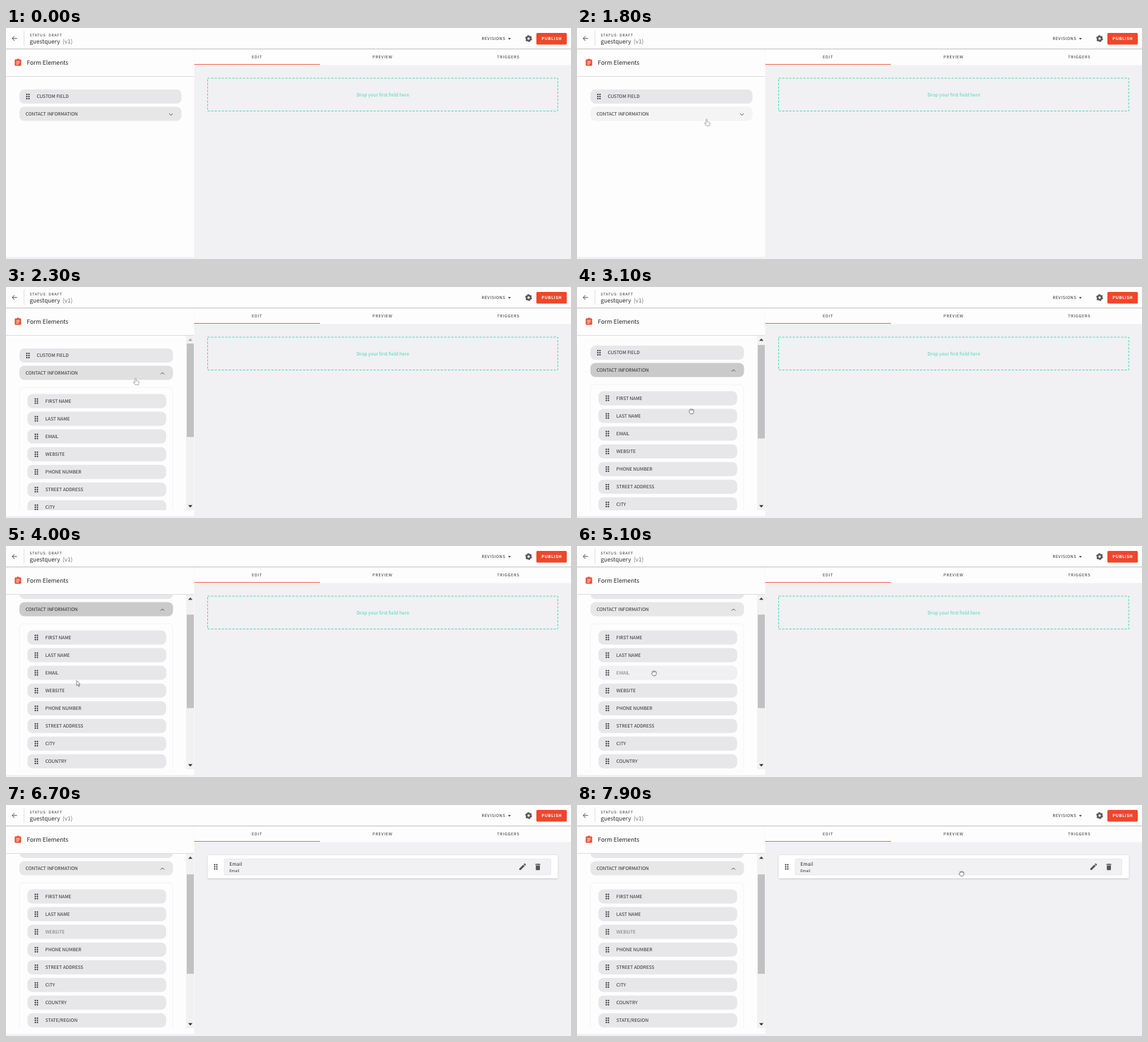
Animation of 800x327 px, one loop 8 s. Source, as an HTML page:

```html
<!DOCTYPE html>
<html lang="en">
<head>
<meta charset="utf-8">
<title>Form builder</title>
<style>
html, body { margin: 0; width: 100%; height: 100%; overflow: hidden; background: #f1f0f2; }
svg { display: block; }
text { font-family: "Noto Sans CJK SC", "Noto Sans CJK JP", "Noto Sans CJK", "Open Sans", sans-serif; font-size: 6.55px; fill: #2c2c2c; white-space: pre; text-rendering: geometricPrecision; }
.tab { font-size: 5.6px; letter-spacing: .7px; }
.line { fill: none; stroke: #555; stroke-width: 1; }
.cur { fill: #fff; stroke: #555; stroke-width: .7; stroke-linejoin: round; }
</style>
</head>
<body>
<svg width="800" height="327" viewBox="0 0 800 327">
  <defs>
    <filter id="soft" x="-5%" y="-20%" width="110%" height="150%">
      <feDropShadow dx="0" dy=".6" stdDeviation=".8" flood-opacity=".25"/>
    </filter>
    <path id="dots" d="M-1.5-3v0M1.5-3v0M-1.5 0v0M1.5 0v0M-1.5 3v0M1.5 3v0" stroke="#222" stroke-width="2" stroke-linecap="round"/>
    <path id="arrow" class="cur" d="M0 0V7.2L1.7 5.7L2.9 8.4L4 7.9L2.8 5.3H5Z"/>
    <path id="point" class="cur" style="stroke:#888" d="M-.8.6Q0-.4.8.6V3.6L4 4.4Q5 4.8 4.8 6L4 9.4H-.6L-3 6.2Q-3.2 5-2 5.2L-.8 6.2Z"/>
    <path id="grab" class="cur" d="M-2.4-.2V-2.2Q-1.8-3.4-1-2.6Q-.2-4 .7-2.8Q1.7-3.5 2.2-2.2Q3.3-2.2 3.3-1V1.2L2.2 3.6H-1.4L-3.3.9Q-3.5-.4-2.4-.2ZM-1-2.6V-1M.7-2.8V-1M2.2-2.2V-1"/>
  </defs>

  <rect width="800" height="327" fill="#f1f0f2"/>
  <rect width="266.5" height="324" fill="#fefdfe"/>
  <rect x="266.5" y="29" width="533.5" height="23.5" fill="#fefdfe"/>
  <path d="M266.5 51.5H444.5" stroke="#ee6a54"/>
  <g text-anchor="middle">
    <text class="tab" x="355.5" y="43.3">EDIT</text>
    <text class="tab" x="533.3" y="43.3">PREVIEW</text>
    <text class="tab" x="711.3" y="43.3">TRIGGERS</text>
  </g>

  <path d="M0 68.5H266" stroke="#dedddf"/>
  <rect x="12.4" y="44.6" width="9" height="9" rx="1" fill="#ea4a2e"/>
  <circle cx="16.9" cy="44.7" r="1.5" fill="#ea4a2e"/>
  <path d="M14.4 47.2h5M14.4 49.2h5M14.4 51.2h3.4" stroke="#fff" stroke-width=".9"/>
  <text x="29.4" y="52" style="font-size:8.4px;fill:#222">Form Elements</text>

  <svg id="list" y="69" width="266.5" height="247" viewBox="0 69 266.5 247"></svg>
  <g id="main"></g>

  <g filter="url(#soft)"><rect x="-5" width="810" height="29" fill="#fefdfe"/></g>
  <path d="M0 29.4H800" stroke="#cfced0" stroke-width=".9"/>
  <path d="M25.5 4V25" stroke="#e2e1e3"/>
  <path class="line" d="M15.6 14.8H8.8M12 11.5L8.7 14.8L12 18.1"/>
  <text x="33.5" y="11.8" style="font-size:5.2px;letter-spacing:.7px">STATUS: DRAFT</text>
  <text x="33.5" y="21.6" style="font-size:8.2px">guestquery</text>
  <text x="80" y="21.6" style="font-size:8.2px;fill:#777">(v1)</text>
  <text x="673.5" y="17.2" style="font-size:5.8px;letter-spacing:.5px">REVISIONS</text>
  <path d="M710.8 14.2h4l-2 2.3z" fill="#333"/>
  <g fill="none" stroke="#555">
    <circle cx="740" cy="15" r="2.8" stroke-width="2.2"/>
    <circle cx="740" cy="15" r="4.1" stroke-width="1.5" stroke-dasharray="2.3 1.99"/>
  </g>
  <rect x="751" y="7" width="43" height="16.5" rx="1.5" fill="#f0462a"/>
  <text x="758.3" y="17.3" style="font-size:5.8px;letter-spacing:.5px;font-weight:600;fill:#fff">PUBLISH</text>

  <g id="cursor"></g>
</svg>
<script>
const LOOP = 8000, STEP = 100;
const DRAG = 5000, ENTER = 5700, DROP = 6700;
const FIELDS = ['FIRST NAME', 'LAST NAME', 'EMAIL', 'WEBSITE', 'PHONE NUMBER',
  'STREET ADDRESS', 'CITY', 'COUNTRY', 'STATE/REGION'];
const ROW = '#e7e6e8', TOP = 151.5, PITCH = 25.05;
const $ = id => document.getElementById(id);

// Piecewise linear track of [time, value, value...] keys
function track(keys, t) {
  if (t <= keys[0][0]) return keys[0].slice(1);
  for (let i = 1; i < keys.length; i++) {
    const a = keys[i - 1], b = keys[i];
    if (t <= b[0]) return a.slice(1).map((v, j) => v + (b[j + 1] - v) * (t - a[0]) / (b[0] - a[0]));
  }
  return keys[keys.length - 1].slice(1);
}

const POINTER = [[1200, 230, 192], [1700, 183.5, 129], [2400, 183.5, 129], [2900, 162, 176],
  [3200, 162, 176], [3800, 100, 190.5], [4100, 100, 190.5], [4500, 109, 180]];
const OPEN = [[2000, 0], [2300, 1]];
const SCROLL = [[3000, 0], [3800, 32]];
const SHADE = [[1500, 231], [1700, 244], [2100, 244], [2300, 224], [2700, 202], [4400, 202], [4600, 231]];
const BALL = [[ENTER, 300, 124], [5900, 466.5, 72.5], [6300, 544, 97]];

const box = (x, y, w, h, r, fill, more = '') =>
  `<rect x="${x}" y="${y}" width="${w}" height="${h}" rx="${r}" fill="${fill}" ${more}/>`;
const label = (x, y, s, style = '') => `<text x="${x}" y="${y}" style="${style}">${s}</text>`;
const dots = (x, y) => `<use href="#dots" x="${x}" y="${y}"/>`;

function fieldRow(name, i, t) {
  const y = TOP + PITCH * i;
  const dragged = name === 'EMAIL' && t >= DRAG;
  const pale = name === 'WEBSITE' && t >= DROP;
  return box(30.3, y, 196.5, 20, 7, dragged ? '#f0eff1' : ROW) + dots(43, y + 10) +
    label(55.8, y + 12.4, name, dragged || pale ? 'fill:#777' : '');
}

function scrollbar(scroll, content) {
  const k = 225 / content;
  return box(255, 69, 11.5, 247, 0, '#f1f1f1') +
    box(256, 80 + scroll * k, 10, 247 * k, 0, '#c1c1c1') +
    `<path d="M258 76.3h6l-3-3.6z" fill="${scroll ? '#444' : '#a8a8a8'}"/>` +
    '<path d="M258 308.7h6l-3 3.6z" fill="#333"/>';
}

function drawList(t, open, scroll) {
  const content = 73 + open * (t < DROP ? 347 : 322);
  const bar = content > 247;
  const w = bar ? 217.5 : 229.5;
  const g = track(SHADE, t)[0];
  const fields = FIELDS.filter(f => f !== 'EMAIL' || t < DROP);
  $('list').innerHTML = `<g transform="translate(0 ${-scroll})">` +
    box(19, 87, w, 20, 7, ROW) + dots(31, 97) + label(43.4, 99.3, 'CUSTOM FIELD') +
    box(19, 111.5, w, 20, 7, `rgb(${g},${g},${g})`) + label(27.7, 123.7, 'CONTACT INFORMATION') +
    `<path class="line" d="M-2.5-1.2L0 1.3L2.5-1.2" transform="translate(${w + 4} 122.3) rotate(${180 * open})"/>` +
    (open ? `<svg y="141" width="255" height="${open * 345}" viewBox="0 141 255 ${open * 345}">` +
      box(19, 142, 217, 320, 5, 'none', 'stroke="#f3f2f4"') +
      fields.map((f, i) => fieldRow(f, i, t)).join('') + '</svg>' : '') +
    '</g>' + (bar ? scrollbar(scroll, content) : '');
}

function dropZone(t) {
  const over = t >= ENTER;
  const color = over ? '#ea5a3c' : '#45dcb2';
  const [x, y] = track(BALL, t);
  return box(285.5, 71, 495.8, 46.5, 0, 'none', `stroke="${color}" stroke-dasharray="3 2"`) +
    `<text x="533.5" y="96.6" text-anchor="middle" style="font-size:6.63px;fill:${color}">Drop your first field here</text>` +
    (over ? `<circle cx="${x}" cy="${y}" r="7" fill="#f0462a"/>` : '');
}

function card() {
  return box(285.7, 71, 495.5, 32.7, 1, '#fff', 'filter="url(#soft)"') +
    box(309, 76.5, 462.5, 22.5, 1, '#f1f0f2', 'stroke="#e4e3e5" stroke-width=".7"') +
    dots(297, 87.5) +
    label(316.2, 85.8, 'Email', 'font-size:6.8px') + label(316.2, 95.2, 'Email', 'font-size:5.3px') +
    `<g fill="#555"><path d="M726.8 92v-2l5.6-5.6l2 2L728.8 92zM733 83.8l1-1q.5-.3 1 .1l1 1q.3.5 0 1l-1 1z"/>
    <path d="M750.2 85.6h5.8v5.6q0 1-1 1h-3.8q-1 0-1-1zM749.5 83.6h2l.6-.6h2l.6.6h2v1.1h-7.2z"/></g>`;
}

function drawCursor(t, open, scroll) {
  const back = t >= 7900;
  let shape = '';
  const [x, y] = back ? [544.5, 97] : track(POINTER, t);
  if (back || (t >= 600 && t < DROP)) {
    const listY = y + scroll, inRow = (listY - TOP) % PITCH;
    if (back || (open === 1 && listY > TOP && inRow < 20)) shape = 'grab';
    else shape = listY > 111 && listY < 132 && x < 248 ? 'point' : 'arrow';
  }
  $('cursor').innerHTML = shape && `<use href="#${shape}" x="${x}" y="${y}"/>`;
}

let last = -1;
function frame(now) {
  const t = Math.floor(now % LOOP / STEP) * STEP;
  if (t !== last) {
    last = t;
    const open = track(OPEN, t)[0], scroll = track(SCROLL, t)[0];
    drawList(t, open, scroll);
    $('main').innerHTML = t < DROP ? dropZone(t) : card();
    drawCursor(t, open, scroll);
  }
  requestAnimationFrame(frame);
}
requestAnimationFrame(frame);
</script>
</body>
</html>
```
